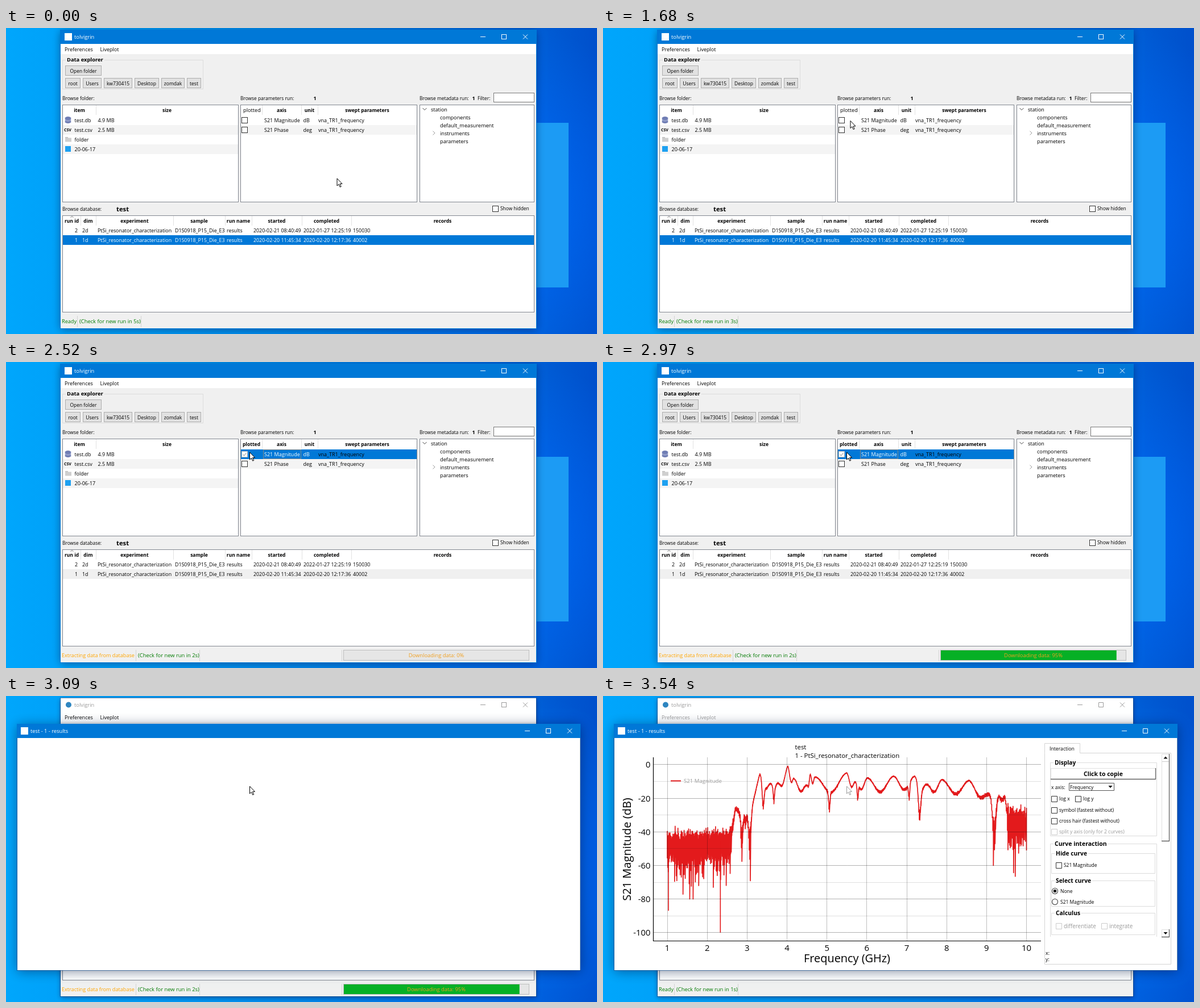
Recreate the animation shown at these times as an HTML page with a canvas. Size 1039x539 px, loop 4120 ms.

```html
<!DOCTYPE html>
<html lang="en">
<head>
<meta charset="utf-8">
<title>Data plot</title>
<style>
html, body { margin: 0; width: 100%; height: 100%; overflow: hidden; }
canvas { display: block; }
</style>
</head>
<body>
<canvas id="stage" width="1039" height="539"></canvas>
<script>
const c = document.getElementById('stage').getContext('2d');
const LOOP = 4120, APP = 'tolvigrin';
const BLUE = '#0078d7', GREY = '#9a9a9a', RED = '#e31a1c', GREEN = '#007a00', EDGE = 'rgba(0,60,130,.6)';
// Moments of the story, in ms
const PRESS = 2270, RELEASE = 2430, BUSY = 2520, OPEN = 3050, SOLID = 3090, PLOT = 3260, READY = 3310, SETTLED = 3340;

// ---------- helpers ----------
const smooth = u => u * u * (3 - 2 * u);

function setFont(size, bold) {
  c.font = `${bold ? 'bold ' : ''}${size}px "Open Sans", "Noto Sans", sans-serif`;
}

function text(s, x, y, size = 9, color = '#000', bold = false, align = 'left') {
  setFont(size, bold);
  c.fillStyle = color;
  c.textAlign = align;
  c.fillText(s, x, y + size * 0.36);
}

function rect(x, y, w, h, fill) {
  c.fillStyle = fill;
  c.fillRect(x, y, w, h);
}

function frame(x, y, w, h, edge) {
  c.strokeStyle = edge;
  c.lineWidth = 1;
  c.strokeRect(x + 0.5, y + 0.5, w - 1, h - 1);
}

function box(x, y, w, h, fill, edge) {
  rect(x, y, w, h, fill);
  frame(x, y, w, h, edge);
}

function path(...p) {
  c.beginPath();
  for (let i = 0; i < p.length; i += 2) c.lineTo(p[i], p[i + 1]);
}

function line(color, width, ...p) {
  c.strokeStyle = color;
  c.lineWidth = width;
  path(...p);
  c.stroke();
}

function disc(x, y, rx, fill, ry = rx) {
  c.fillStyle = fill;
  c.beginPath();
  c.ellipse(x, y, rx, ry, 0, 0, 7);
  c.fill();
}

function check(x, y, label, size = 8.6, off = false) {
  box(x, y - 5, 11, 11, '#fff', off ? '#ccc' : '#333');
  if (label) text(label, x + 14, y, size, off ? GREY : '#000');
}

function group(title, x, y, w, h, size, bg) {
  frame(x, y, w, h, '#dcdcdc');
  setFont(size, true);
  rect(x + 6, y - 5, c.measureText(title).width + 4, 11, bg);
  text(title, x + 8, y, size, '#000', true);
}

function shadowed(x, y, w, h, fill, blur) {
  c.save();
  c.shadowColor = 'rgba(0,20,60,.5)';
  c.shadowBlur = blur;
  c.shadowOffsetY = 2;
  rect(x, y, w, h, fill);
  c.restore();
}

function titleBar(x, y, w, title, active) {
  const ink = active ? '#fff' : GREY, m = y + 12.5, r = x + w;
  rect(x, y, w, 25, active ? BLUE : '#fff');
  if (active) rect(x + 7, m - 6.5, 13, 13, '#fff');
  else disc(x + 14, m, 5, '#2e86c1');
  text(title, x + 24, m, 9.3, ink);
  line(ink, 1, r - 98, m, r - 89, m);
  frame(r - 61, m - 4.5, 9, 9, ink);
  for (const d of [-4, 4]) line(ink, 1, r - 23, m - d, r - 15, m + d);
}

// ---------- desktop ----------
function desktop() {
  const base = c.createLinearGradient(0, 0, 1039, 0);
  ['#00a6fc', '#0099f4', '#0086ea', '#006fe0', '#0050cc'].forEach((s, i) => base.addColorStop(i / 4, s));
  rect(0, 0, 1039, 539, base);
  const glow = c.createRadialGradient(850, 312, 60, 850, 312, 330);
  glow.addColorStop(0, 'rgba(0,108,255,.7)');
  glow.addColorStop(1, 'rgba(0,108,255,0)');
  rect(0, 0, 1039, 539, glow);
  rect(699, 167, 290, 290, '#1c9bf4');
}

// ---------- main window ----------
// Column edges give the separators and centre the headings.
function table(y, h, edges, heads) {
  const x = edges[0], w = edges.at(-1) - x;
  box(x - 1, y, w + 2, h, '#fff', '#828790');
  heads.forEach((s, i) => {
    if (i) line('#e2e2e2', 1, edges[i] + 0.5, y + 1, edges[i] + 0.5, y + 18);
    text(s, (edges[i] + edges[i + 1]) / 2, y + 10, 8.5, '#000', true, 'center');
  });
}

function folderPane() {
  text('Browse folder:', 99, 123.5, 8.4);
  table(135, 172, [100, 158, 408], ['item', 'size']);
  ['test.db', 'test.csv', 'folder', '20-06-17'].forEach((s, i) => {
    if (i % 2) rect(100, 154 + 17 * i, 308, 17, '#f4f4f4');
    text(s, 120.5, 162.5 + 17 * i);
  });
  for (const y of [165, 162, 159]) disc(109, y, 5.5, y === 162 ? '#8f9bc8' : '#6f7db4', 3);
  text('CSV', 102, 179, 7, '#000', true);
  rect(104, 192, 5, 3, '#c4c4c4');
  rect(104, 193.5, 11, 7, '#cfcfcf');
  rect(104, 208, 10, 10, '#1ea0f0');
  text('4.9 MB', 161.5, 162.5);
  text('2.5 MB', 161.5, 179.5);
}

function paramPane(t) {
  const picked = t >= RELEASE;
  text('Browse parameters run:', 412, 123.5, 8.4);
  text('1', 540.5, 123.5, 9, '#000', true);
  table(135, 172, [413, 450, 519, 548, 722], [t < PRESS ? '' : 'plotted', 'axis', 'unit', 'swept parameters']);
  if (t < PRESS) text('plotted', 432.5, 145, 9.2, '#000', false, 'center');
  rect(413, 171, 309, 17, '#f4f4f4');
  if (picked) rect(413, 154, 309, 17, BLUE);
  check(414, 162);
  check(414, 179);
  if (picked) {
    box(414, 157, 11, 11, '#fff', '#bbb');
    line('#aaa', 1.2, 416.5, 162.5, 418.5, 165, 422.5, 160);
    c.setLineDash([1, 1]);
    frame(452, 154, 67, 17, '#ff9a40');
    c.setLineDash([]);
  }
  [['S21 Magnitude', 'dB'], ['S21 Phase', 'deg']].forEach(([axis, unit], i) => {
    const y = 162.5 + 17 * i, ink = picked && !i ? '#fff' : '#000';
    text(axis, 454, y, 9, ink);
    text(unit, 522.5, y, 9, ink);
    text('vna_TR1_frequency', 549, y);
  });
}

function metaPane() {
  text('Browse metadata run:', 727, 123.5, 8.4);
  text('1', 819.5, 123.5, 9, '#000', true);
  text('Filter:', 829, 123.5, 8.6);
  box(857, 114, 72, 17, '#fff', '#7a7a7a');
  box(727, 135, 202, 172, '#fff', '#828790');
  line('#444', 1, 732.5, 141, 736, 144.5, 739.5, 141);
  line(GREY, 1, 750.5, 181.5, 754, 185, 750.5, 188.5);
  text('station', 747, 144);
  ['components', 'default_measurement', 'instruments', 'parameters']
    .forEach((s, i) => text(s, 763, 158 + 14 * i, 9.2));
}

function databasePane(t) {
  const active = t < PRESS, edges = [100, 131, 158, 294, 385, 432, 520, 607, 928];
  text('Browse database:', 99, 318.5, 8.4);
  text('test', 194, 318.5, 11.3, '#000', true);
  check(855, 318, 'Show hidden', 8.4);
  table(330, 171, edges,
    ['run id', 'dim', 'experiment', 'sample', 'run name', 'started', 'completed', 'records']);
  line('#777', 1, 113.5, 334, 116, 331.5, 118.5, 334);
  rect(100, 365, 828, 17, active ? BLUE : '#f0f0f0');
  const setup = ['PtSi_resonator_characterization', 'D1S0918_P15_Die_E3', 'results'];
  [['2', '2d', ...setup, '2020-02-21 08:40:49', '2022-01-27 12:25:19', '150030'],
   ['1', '1d', ...setup, '2020-02-20 11:45:34', '2020-02-20 12:17:36', '40002']]
    .forEach((row, r) => row.forEach((s, i) => text(s, i ? edges[i] + 3 : 126, 357 + 17 * r, 8.85,
      r && active ? '#fff' : '#000', false, i ? 'left' : 'right')));
}

function statusBar(t) {
  const seconds = 5 - Math.floor((t + 465) / 995);
  const busy = t >= BUSY && t < READY, x = busy ? 232 : 129;
  text(busy ? 'Extracting data from database' : 'Ready', 98, 517, 9.15, busy ? '#ffa500' : GREEN);
  text(`(Check for new run in ${seconds}s)`, x, 517, 9.35, GREEN);
  for (const s of [x - 3.5, x + 108.5]) line('#d4d4d4', 1, s, 507, s, 527);
  if (!busy) return;
  const pct = Math.min(95, Math.max(0, 25 * Math.floor((t - 2704) / 66)));
  line('#d4d4d4', 1, 590.5, 507, 590.5, 527);
  box(593, 507, 327, 19, '#e6e6e6', '#bcbcbc');
  rect(594, 508, 325 * pct / 100, 17, '#06b025');
  text(`Downloading data: ${pct}%`, 756.5, 517, 9.4, '#f0a020', false, 'center');
}

function button(s, x, y) {
  setFont(8.5);
  const w = Math.round(c.measureText(s).width + 10);
  box(x, y, w, 18, '#e1e1e1', '#adadad');
  text(s, x + w / 2, y + 9.5, 8.5, '#000', false, 'center');
  return x + w + 4;
}

function mainWindow(t) {
  const active = t < OPEN, ink = t < READY ? '#000' : GREY;
  shadowed(96, 4, 836, 525, '#f0f0f0', active ? 14 : 8);
  titleBar(96, 3, 836, APP, active);
  rect(96, 28, 836, 18, '#fff');
  text('Preferences', 103, 38, 9, ink);
  text('Liveplot', 165.5, 38, 9, ink);
  group('Data explorer', 99, 56, 248, 52, 9.35, '#f0f0f0');
  box(104, 66, 64, 18, '#e1e1e1', '#adadad');
  text('Open folder', 136, 75.5, 8.4, '#000', false, 'center');
  ['root', 'Users', 'kw730415', 'Desktop', 'zomdak', 'test'].reduce((x, s) => button(s, x, 88), 104);
  folderPane();
  paramPane(t);
  metaPane();
  databasePane(t);
  statusBar(t);
  frame(95, 3, 838, 527, active ? BLUE : EDGE);
}

// ---------- measured curve ----------
// Peaks as GHz, dB; valleys between them deepen with the gap.
const PEAKS = [1, -60, 2.55, -50, 2.71, -26, 2.97, -33, 3.32, -5.5, 3.6, -11.5, 3.75, -11.5, 4.02, -0.8,
  4.18, -8.5, 4.5, -12.5, 4.58, -5.5, 4.7, -7.5, 5.5, -5, 5.72, -10.5, 6.01, -8, 6.67, -7, 7.2, -7,
  7.5, -12, 7.88, -9, 8.57, -9.5, 9.08, -18, 9.31, -19, 9.46, -19, 9.6, -45, 10, -45];
// Narrow resonances as GHz, depth in dB
const NOTCHES = [2.87, 14, 3.07, 18, 3.4, 14, 3.67, 7, 5.06, 10, 5.77, 9, 7.06, 9, 7.32, 17, 9.19, 22];

function response(f) {
  let i = 0;
  while (i < PEAKS.length - 4 && PEAKS[i + 2] < f) i += 2;
  const [f0, a, f1, b] = PEAKS.slice(i, i + 4);
  const gap = f1 - f0, u = (f - f0) / gap;
  const depth = (5 + 10 * gap) * Math.max(0, 1 + (a + b) / 60);
  let db = a + (b - a) * u - depth * Math.sin(Math.PI * u) ** 2;
  for (let n = 0; n < NOTCHES.length; n += 2) {
    const d = NOTCHES[n + 1];
    db -= d * Math.exp(-(((f - NOTCHES[n]) / (0.0024 * d)) ** 2));
  }
  return db;
}

let seed = 77;
function random() {
  seed = (seed * 1664525 + 1013904223) % 4294967296;
  return (seed + 1) / 4294967297;
}

// Highest and lowest noisy reading in each narrow band
const TRACE = Array.from({ length: 641 }, (_, k) => {
  const f = 1 + 9 * k / 640, level = 10 ** (response(f) / 20);
  const noise = 10 ** ((f < 3.2 ? -46.5 : f < 9.52 ? -41 : -32) / 20);
  const readings = Array.from({ length: 14 }, () => {
    const r = noise * Math.sqrt(-Math.log(random())), a = 2 * Math.PI * random();
    return 20 * Math.log10(Math.hypot(level + r * Math.cos(a), r * Math.sin(a)));
  });
  return [f, Math.max(...readings), Math.max(-80, Math.min(...readings))];
});

function plot(settled) {
  const shift = settled ? 5 : 0, x1 = 108 + shift, left = 83.5 + shift;
  const X = f => x1 + (744.5 - x1) * (f - 1) / 9;
  const Y = db => 120.8 - db * (settled ? 2.96 : 2.97);

  c.lineJoin = 'round';
  line(RED, 1.7, ...TRACE.flatMap(([f, hi, lo]) => [X(f), Y(hi), X(f), Y(lo)]));
  line(RED, 1.6, X(1.03), Y(-45), X(1.03), Y(-87));
  line(RED, 1.6, X(2.33), Y(-45), X(2.33), Y(-100));

  for (let f = 1; f <= 10; f++) {
    const x = Math.floor(X(f)) + 0.5;
    line('rgba(0,0,0,.25)', 1, x, 108, x, 431);
    text(f, X(f), 443.5, 14.8, '#000', false, 'center');
  }
  for (let db = 0; db >= -100; db -= 10) {
    const y = Math.floor(Y(db)) + 0.5, major = db % 20 === 0;
    line(`rgba(0,0,0,${major ? 0.3 : 0.12})`, 1, left, y, 770, y);
    if (major) text(db, left - 5, y + 0.5, 14.8, '#000', false, 'right');
  }
  line('#000', 1.2, left, 108, left, 431.5, 770, 431.5);

  const tx = 334 + shift * 0.7;
  text('test', tx, 90, 11.4);
  text('1 - PtSi_resonator_characterization', tx, 104.5, 11.4);
  text('Frequency (GHz)', 426 + shift * 0.6, 462.5 - shift * 0.2, 19.9, '#000', false, 'center');
  c.save();
  c.translate(42, 270);
  c.rotate(-Math.PI / 2);
  text('S21 Magnitude (dB)', 0, 0, 20, '#000', false, 'center');
  c.restore();
  line(RED, 2, 114 + shift, 149.5, 132 + shift, 149.5);
  text('S21 Magnitude', 137 + shift, 150, 9.6, GREY);
}

// ---------- side panel ----------
function arrow(x, y, dir) {
  c.fillStyle = '#000';
  path(x - 3.5, y - 2 * dir, x + 3.5, y - 2 * dir, x, y + 2 * dir);
  c.fill();
}

function raised(x, y, w, h) {
  rect(x, y, w, h, '#fff');
  line('#e0e0e0', 1, x + 0.5, y + h, x + 0.5, y + 0.5, x + w, y + 0.5);
  line('#606060', 1.3, x + w - 0.5, y, x + w - 0.5, y + h - 0.5, x, y + h - 0.5);
}

function radio(y, label, on) {
  disc(794.5, y, 5.5, '#333');
  disc(794.5, y, 4.5, '#fff');
  if (on) disc(794.5, y, 2.8, '#222');
  text(label, 804, y + 0.5, 8.5);
}

function sidePanel() {
  box(776, 100, 223, 373, '#fff', '#d4d4d4');
  box(776, 83, 63, 18, '#fff', '#d4d4d4');
  rect(777, 99, 61, 3, '#fff');
  text('Interaction', 785, 92.5, 8.7);

  raised(982, 102, 14, 154);
  line('#ccc', 1, 983, 115.5, 995, 115.5);
  arrow(989, 108.5, -1);
  raised(982, 411, 14, 14);
  arrow(989, 418, 1);

  group('Display', 786, 117, 188, 130, 10.2, '#fff');
  raised(787, 127, 185, 20);
  text('Click to copie', 879.5, 137.5, 10.4, '#000', true, 'center');
  text('x axis:', 788, 160.5, 8.6);
  box(819, 153, 80, 14, '#fff', '#555');
  text('Frequency', 821, 160.5, 8.5);
  arrow(892, 160, 1);
  check(788, 181, 'log x');
  check(830, 181, 'log y');
  check(788, 201, 'symbol (fastest without)');
  check(788, 220, 'cross hair (fastest without)');
  check(788, 239, 'split y axis (only for 2 curves)', 8.6, true);

  group('Curve interaction', 786, 260, 188, 166, 10.5, '#fff');
  rect(786, 424, 188, 3, '#fff');
  group('Hide curve', 788, 277, 183, 36, 10.3, '#fff');
  check(796, 298, 'S21 Magnitude', 8.4);
  group('Select curve', 788, 325, 183, 46, 10.3, '#fff');
  radio(343.5, 'None', true);
  radio(362.5, 'S21 Magnitude', false);
  group('Calculus', 788, 382, 183, 39, 10.3, '#fff');
  check(796, 405, 'differentiate', 9.9, true);
  check(876, 405, 'integrate', 9.9, true);
  text('x:', 778, 453);
  text('y:', 778, 463.5);
}

function resultWindow(t) {
  if (t < SOLID) {
    // The body is still see-through
    rect(20, 74, 76, 409, 'rgba(0,50,130,.22)');
    rect(932, 74, 78, 409, 'rgba(0,50,130,.22)');
  } else {
    shadowed(20, 50, 990, 433, '#fff', 20);
    if (t >= PLOT) {
      plot(t >= SETTLED);
      sidePanel();
    }
  }
  frame(19, 49, 991, 435, EDGE);
  titleBar(19, 49, 991, 'test - 1 - results', true);
}

// ---------- pointer ----------
function pointer(t) {
  const e = t < 1090 ? 0 : smooth(Math.min(1, (t - 1050) / 720));
  if (t >= PRESS && t < RELEASE) disc(428, 161.5, 10, 'rgba(255,238,40,.65)');
  c.save();
  c.translate(582 - 153.5 * e, 265 - 106 * e);
  path(0, 0, 0, 13, 3, 10.3, 5.2, 15.2, 7.2, 14.3, 5, 9.6, 9, 9.4);
  c.closePath();
  c.fillStyle = '#fff';
  c.fill();
  c.strokeStyle = t < PLOT ? '#000' : '#999';
  c.lineWidth = 1;
  c.stroke();
  c.restore();
}

function draw(now) {
  const t = now % LOOP;
  desktop();
  mainWindow(t);
  if (t >= OPEN) resultWindow(t);
  pointer(t);
  requestAnimationFrame(draw);
}
draw(0);
</script>
</body>
</html>
```
